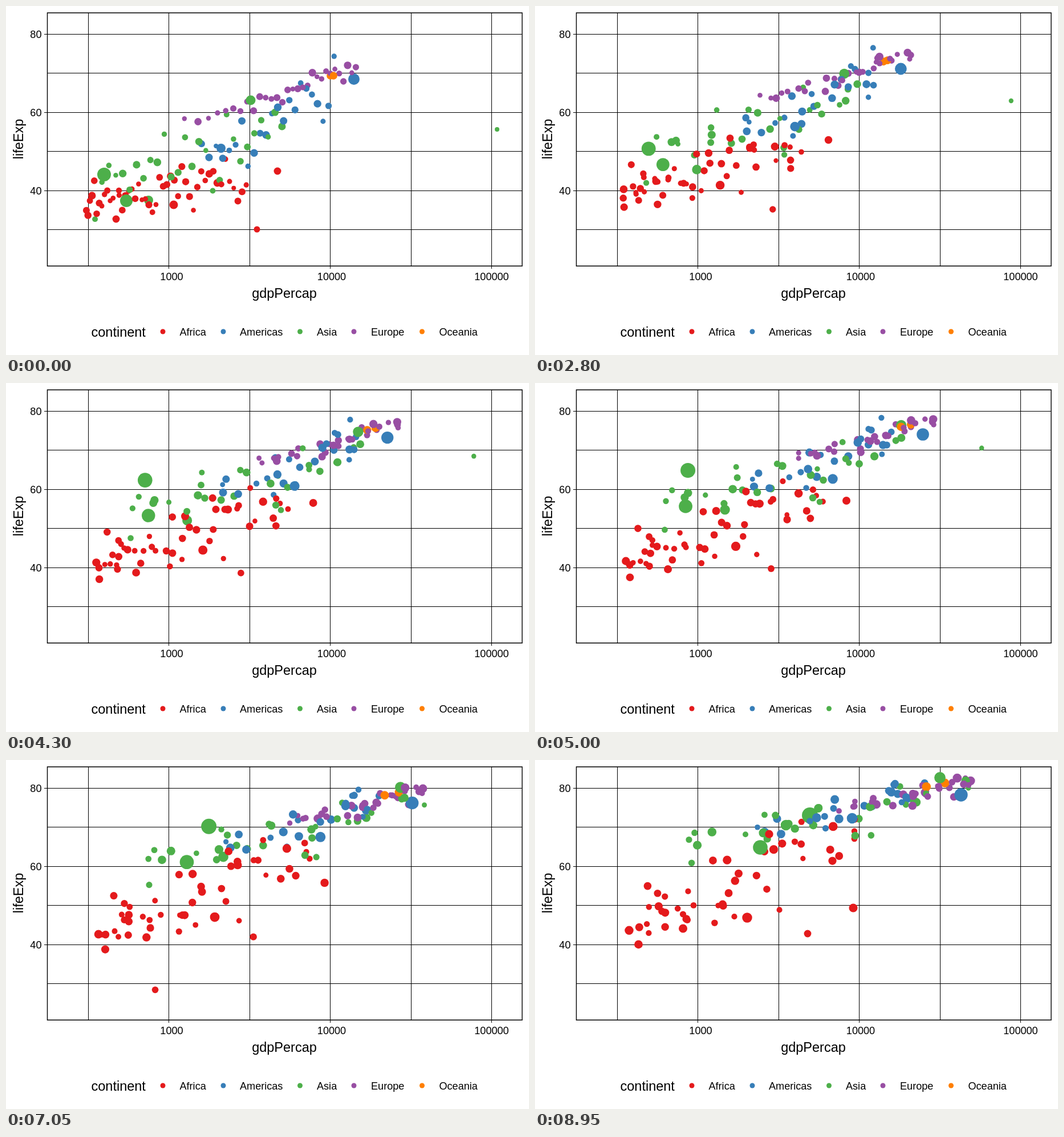
Animation, 917 px wide and 611 px high, one loop 10 s. Source, as an HTML page:

```html
<!DOCTYPE html>
<html lang="en">
<head>
<meta charset="utf-8">
<title>Life expectancy and income</title>
<style>
  html, body { margin: 0; width: 100%; height: 100%; overflow: hidden; background: #fff; }
  svg { display: block; width: 100%; height: 100%; font: 18.1px "Liberation Sans", Arial, sans-serif; }
  .title { font-size: 23.5px; }
  .line { stroke: #000; fill: none; }
</style>
</head>
<body>
<svg id="chart" viewBox="0 0 917 611"></svg>
<script>
const chart = document.getElementById('chart');
const LOOP = 10000, STEP = 50, PAUSE = 20, LAST = 159, SPANS = 11, MID = 5.59;
const DECADE = 283, LIFE_ROW = 68.45;

// Each continent fills a band between two ends; the band moves from its first to its last place.
const continents = {
  Africa: { color: '#e41a1c', legend: [275, 304.5], count: 48, bend: 1.25,
    from: [140, 340, 425, 305], to: [165, 290, 560, 130], scatter: [55, 85] },
  Americas: { color: '#377eb8', legend: [381, 410], count: 23, bend: 0.9,
    from: [335, 270, 580, 140], to: [390, 125, 690, 45], scatter: [70, 32] },
  Asia: { color: '#4daf4a', legend: [515.5, 545], count: 28, bend: 1,
    from: [150, 330, 490, 200], to: [270, 155, 755, 45], scatter: [80, 45] },
  Europe: { color: '#984ea3', legend: [610, 640], count: 30, bend: 0.65,
    from: [290, 215, 617, 110], to: [505, 92, 765, 42], scatter: [20, 18] },
  Oceania: { color: '#ff7f00', legend: [729.5, 759.5], count: 2, bend: 1,
    from: [566, 122, 577, 122], to: [735, 37, 670, 50], scatter: [0, 0] }
};

// Leading dots: continent, radius, then start, middle and end position.
const leaders = [
  ['Asia', 12, 172, 295, 268, 153, 482, 97],
  ['Asia', 11, 211, 341, 264, 216, 395, 153],
  ['Asia', 8.5, 429, 165, 642, 74, 710, 31],
  ['Asia', 8, 250, 340, 333, 222, 440, 114],
  ['Asia', 4, 861, 216, 741, 114, 760, 49],
  ['Americas', 10, 610, 128, 680, 90, 747, 61],
  ['Americas', 8, 377, 249, 522, 168, 556, 102],
  ['Africa', 7.5, 294, 348, 352, 286, 372, 276],
  ['Africa', 6.5, 476, 289, 546, 206, 558, 259],
  ['Africa', 5.5, 440, 391, 414, 325, 478, 304],
  ['Africa', 5.2, 198, 323, 262, 283, 267, 280]
];

// Sudden departures by leader index: span, width, dx, dy.
const kinks = { 0: [2, 1, 0, 58], 4: [4, 3, 90, 0], 10: [8, 1, -12, 153] };

let seed = 1952;
function random() {
  seed = (seed * 1664525 + 1013904223) >>> 0;
  return seed / 4294967296;
}
const clamp = (v, lo, hi) => Math.min(hi, Math.max(lo, v));
const lerp = (a, b, f) => a + (b - a) * f;
const spread = () => random() + random() - 1;

function add(tag, attrs, text) {
  const node = document.createElementNS('http://www.w3.org/2000/svg', tag);
  for (const name in attrs) node.setAttribute(name, attrs[name]);
  if (text) node.textContent = text;
  chart.appendChild(node);
  return node;
}
const line = d => add('path', { d, class: 'line' });
const label = (x, y, text, anchor = 'start', more = {}) =>
  add('text', { x, y, 'text-anchor': anchor, ...more }, text);

function drawFrame() {
  for (let i = 0; i < 6; i++) {
    const x = Math.floor(144 + i * DECADE / 2) + 0.5;
    const y = Math.floor(49.4 + i * LIFE_ROW) + 0.5;
    line(`M${x} 12V455`);
    line(`M72 ${y}H905`);
    if (i % 2) {
      // Shorter numbers are padded on the left, so they sit right of their tick.
      const value = 10 ** (3 + (i - 1) / 2);
      line(`M${x} 455v5`);
      label(x + 2.5 * (6 - String(value).length), 479.5, value, 'middle');
    } else {
      line(`M67 ${y}h5`);
      label(62.5, y + 6.5, 80 - 10 * i, 'end');
    }
  }
  const title = { class: 'title' };
  label(488, 511, 'gdpPercap', 'middle', title);
  label(0, 0, 'lifeExp', 'middle', { ...title, transform: 'translate(29.5 233) rotate(-90)' });
  label(149.5, 579, 'continent', 'start', title);
  for (const name in continents) {
    const { color, legend: [dot, text] } = continents[name];
    add('circle', { cx: dot, cy: 570, r: 4.5, fill: color });
    label(text, 577, name);
  }
}

// Position inside a band: rank along it, offset across it.
const inBand = ([x0, y0, x1, y1], rank, offset) =>
  [lerp(x0, x1, rank), lerp(y0, y1, rank) + offset];

function crowdDot({ color, count, bend, from, to, scatter }, i) {
  const rank = (i + 0.5) / count, offset = spread();
  const drift = count > 2 ? 0.25 * spread() : 0;
  const start = inBand(from, rank ** bend, scatter[0] * offset);
  const end = inBand(to, clamp(rank + drift, 0, 1) ** bend, scatter[1] * (offset + 0.4 * spread()));
  return {
    color, r: 4 + 2.8 * random(),
    at: s => start.map((v, axis) => lerp(v, end[axis], (s / SPANS) ** 0.75))
  };
}

// A parabola in time through three positions, plus an optional kink.
function leaderDot([name, r, ...p], i) {
  const [at, width, ...pull] = kinks[i] || [0, 1, 0, 0];
  return {
    color: continents[name].color, r,
    at: s => [0, 1].map(axis =>
      p[axis] * (s - MID) * (s - SPANS) / (MID * SPANS) +
      p[axis + 2] * s * (SPANS - s) / (MID * (SPANS - MID)) +
      p[axis + 4] * s * (s - MID) / (SPANS * (SPANS - MID)) +
      pull[axis] * Math.max(0, 1 - Math.abs(s - at) / width))
  };
}

function makeDots() {
  const dots = leaders.map(leaderDot);
  for (const group of Object.values(continents)) {
    for (let i = 0; i < group.count; i++) dots.push(crowdDot(group, i));
  }
  for (const dot of dots) dot.depth = random();
  dots.sort((a, b) => a.depth - b.depth);
  for (const dot of dots) dot.node = add('circle', { fill: dot.color });
  return dots;
}

// Every five-year span eases in and out by itself.
function spanAt(time) {
  const frame = clamp(Math.floor(time / STEP) - PAUSE, 0, LAST);
  const edge = i => Math.round(LAST * i / SPANS);
  let i = 0;
  while (i < SPANS - 1 && frame >= edge(i + 1)) i++;
  const f = (frame - edge(i)) / (edge(i + 1) - edge(i));
  return i + (f < 0.5 ? 4 * f ** 3 : 1 - 4 * (1 - f) ** 3);
}

drawFrame();
const dots = makeDots();
line('M72.5 12H905V455.2H72.5Z').setAttribute('stroke-width', 1.4);

function draw() {
  const s = spanAt(performance.now() % LOOP);
  for (const { node, r, at } of dots) {
    const [x, y] = at(s);
    node.setAttribute('cx', x.toFixed(2));
    node.setAttribute('cy', Math.max(31, y).toFixed(2));
    node.setAttribute('r', (r * (1 + 0.015 * s)).toFixed(2));
  }
  requestAnimationFrame(draw);
}
draw();
</script>
</body>
</html>
```
